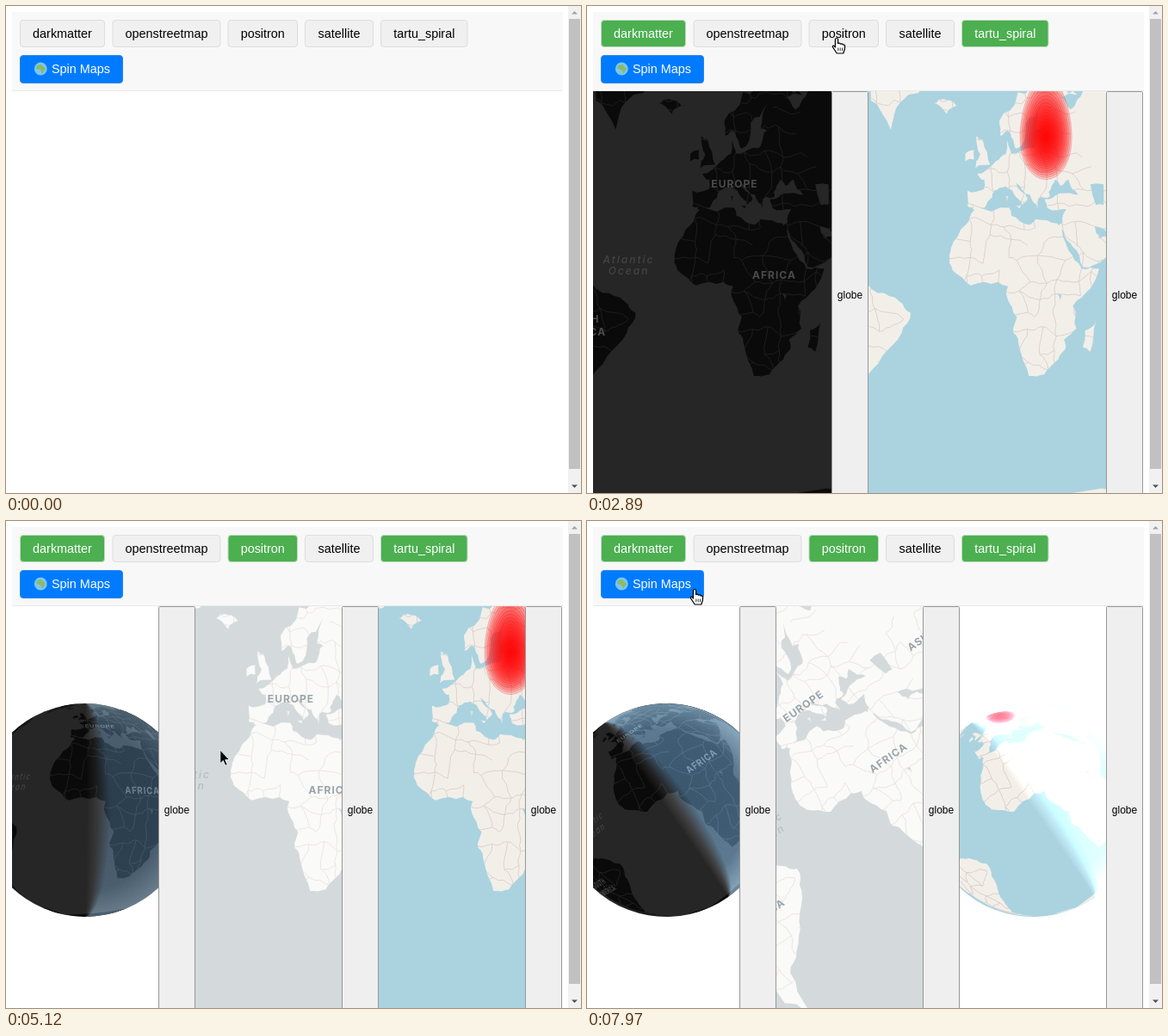
An HTML page with a canvas that plays this animation: 668x566 px, repeating every 8 s.

```html
<!DOCTYPE html>
<html>
<head>
<meta charset="utf-8">
<title>Map viewer</title>
<style>
html, body { margin: 0; width: 100%; height: 100%; overflow: hidden; background: #fff; }
canvas { display: block; width: 668px; height: 566px; }
</style>
</head>
<body>
<canvas id="stage" width="668" height="566"></canvas>
<script>
const ctx = document.getElementById('stage').getContext('2d');
const UI = '"Liberation Sans", Arial, sans-serif';
const RAD = Math.PI / 180, K = 146, CAM = 711, LIMB = 124, MID_Y = 336;

const clamp = v => Math.max(0, Math.min(1, v));
const ease = v => v * v * (3 - 2 * v);
const lonOf = x => x / K / RAD;
const latOf = y => Math.atan(Math.sinh(-y / K)) / RAD;

let seed = 7;
function rand() {
  seed = (seed * 16807) % 2147483647;
  return seed / 2147483647 - .5;
}

// Split every edge and push its middle sideways, for a natural coast
function rough(pts, depth, closed = true) {
  if (!depth) return pts;
  const out = [], n = pts.length;
  for (let i = 0; i < n; i += 2) {
    const x = pts[i], y = pts[i + 1];
    out.push(x, y);
    if (!closed && i + 2 >= n) break;
    const dx = pts[(i + 2) % n] - x, dy = pts[(i + 3) % n] - y;
    const k = rand() * Math.min(.3, 2 / Math.hypot(dx, dy));
    out.push(x + dx / 2 - dy * k, y + dy / 2 + dx * k);
  }
  return rough(out, depth - 1, closed);
}

// Key points of the coasts as lon, lat
const africa = [-6,36,10,37,11,34,19,30.5,22,32.7,32,31,37,20,43,12,51,12,47,3,39,-5,40.6,-15,35,-20,35.5,-24,32.5,-28,26,-34,19,-34.6,14.5,-22.5,12,-17,13.5,-10,9,-1,9.5,4,5,6,-7.5,4.4,-13,9,-17.3,14.7,-16.5,21,-9.8,30.5];
const north = [-5.5,36,-9,37.5,-9,43,-1.5,43.4,-1.3,46.5,-4.5,48.3,4,52,8.5,54,9,57.5,11,54,21,55.5,23.5,59.2,30,60,22,60.3,25,65.5,17.5,61.5,16,56.5,12.8,55.5,10.5,59.3,6,58.5,5.5,62,14,67.5,26,71,41,67,33,66.5,38,64.3,44,68,68,69,73,73,110,76,180,70];
const asia = [180,64,163,60,157,51,155,59.3,136,55,140,48,128,40,126.5,35,121,40,119,36,121,28,108,21.5,108,11,100,13.5,103.5,1.4,98.5,8,96,16.5,90,22,80,14,77.5,8,72.8,20,67,24.8,57,26,49,30,51.5,25,56.3,25.5,59.8,22.5,53,16,43.5,12.7,39,21.5,34.8,28,32.6,30];
const med = [34.3,31.3,36,36.5,27.5,36.8,26.3,40,33,42,41.5,41.5,37,46.5,33.6,44.5,31,46.5,28,42.5,28.5,41,23.3,40.3,23,36.6,19.5,41.5,13,45.5,18.4,40.2,16,38,12,42,8.5,44.3,3.2,43,0,39,-2,36.8];
const southAmerica = [-35,-8,-39,-17,-48,-27,-57,-36,-65,-41,-68,-54,-75,-48,-71,-30,-70,-18.5,-81,-5,-77.5,8,-72,12,-60,9,-50,1,-40,-2.9];
const northAmerica = [-77.5,8,-105,20,-117,32,-124,45,-140,60,-165,58,-157,71,-95,71,-94,60,-80,53,-77,62,-64,58,-57,52,-66,45,-76,36,-81,26,-96,28.5,-96,19,-88,21,-84,11];
const greenland = [-55,75,-53,66,-44,60,-40,65.5,-23,70,-20,80];
const britain = [-5.5,50,1.3,51,-2,57.5,-5,58.5,-3.2,54,-5,52];
const ireland = [-10,52,-6,52.5,-6,55,-10,54];
const iceland = [-24,65.5,-18.5,63.4,-14,65,-20,66.3];
const madagascar = [49.5,-12,47,-25,43.5,-23,44.5,-16];
const sicily = [12.5,38,15.5,38,15,36.7];
const sardinia = [8.4,41,9.6,41,9,39];
const australia = [113.5,-22,131,-12,142,-11,153,-27,148,-38,131,-31.5,115,-34];
const antarctica = [-62,-64,-50,-75,52,-65.8,170,-70,170,-83,-62,-83];
const caspian = [47,45,53,45,53,38,49.5,38];
const victoria = [32,.5,34,0,33,-2.5];

const land = [africa, [...north, ...asia, ...med], southAmerica, northAmerica, greenland, britain,
  ireland, iceland, madagascar, sicily, sardinia, australia, antarctica].map(p => rough(p, 2));
const lakes = [caspian, victoria].map(p => rough(p, 1));

// Country borders: a shaken grid with gaps, cut to the land when drawn
function makeBorders() {
  const step = 21, cols = 32, rows = 20, nodes = [], lines = [];
  for (let j = 0; j < rows; j++)
    for (let i = 0; i < cols; i++)
      nodes.push([lonOf((i - 16 + rand() * .8) * step), latOf((j - 13 + rand() * .8) * step)]);
  nodes.forEach((a, n) => {
    const links = [n % cols < cols - 1 && nodes[n + 1], nodes[n + cols]];
    for (const b of links) {
      const russia = a[0] > 34 && a[1] > 49;
      if (b && !russia && rand() < .3) lines.push(rough([...a, ...b], 2, false));
    }
  });
  return lines;
}
const borders = makeBorders();

// Text with its place on the flat map
const labels = [
  { text: 'EUROPE', x: 26, y: -129 }, { text: 'AFRICA', x: 72, y: -23 }, { text: 'ASIA', x: 181, y: -113 },
  { text: 'SOUTH', x: -155, y: 28 }, { text: 'AMERICA', x: -155, y: 43 },
  { text: 'Atlantic', x: -97, y: -41, sea: true }, { text: 'Ocean', x: -97, y: -28, sea: true }
];

const styles = {
  dark: { water: '#262626', land: '#0a0a0a', line: '#202020', text: '#4b4b4b', sea: '#444' },
  light: { water: '#d4dadc', land: '#fafaf8', line: '#ebe4e4', text: '#98a4aa', sea: '#b3bec2' },
  street: { water: '#aad3df', land: '#f2efe9', line: '#dccdcd', spiral: true }
};

function flat(lon, lat) {
  return [K * lon * RAD, -K * Math.asinh(Math.tan(lat * RAD)), false];
}

function sphere(lon, lat) {
  const a = lon * RAD, b = lat * RAD;
  const x = K * Math.cos(b) * Math.sin(a), y = -K * Math.sin(b), z = K * Math.cos(b) * Math.cos(a);
  const hidden = z < K * K / (CAM + K);
  const s = hidden ? LIMB / Math.hypot(x, y) : CAM / (CAM + K - z);
  return [x * s, y * s, hidden];
}

function trace(pts, proj, open) {
  let pen = false;
  for (let i = 0; i < pts.length; i += 2) {
    const [x, y, hidden] = proj(pts[i], pts[i + 1]);
    if (open && hidden) { pen = false; continue; }
    if (pen) ctx.lineTo(x, y); else ctx.moveTo(x, y);
    pen = true;
  }
  if (!open) ctx.closePath();
}

function shape(list, proj, color) {
  ctx.fillStyle = color;
  ctx.beginPath();
  for (const pts of list) trace(pts, proj);
  ctx.fill();
}

function drawLand(st, proj) {
  ctx.save();
  shape(land, proj, st.land);
  ctx.clip();
  ctx.strokeStyle = st.line;
  ctx.lineWidth = .9;
  ctx.beginPath();
  for (const b of borders) trace(b, proj, true);
  ctx.stroke();
  ctx.restore();
  shape(lakes, proj, st.water);
}

function drawLabels(st, proj) {
  const at = (x, y) => proj(lonOf(x), latOf(y));
  ctx.textAlign = 'center';
  ctx.textBaseline = 'middle';
  for (const { text, sea, x, y } of labels) {
    const o = at(x, y), e = at(x + 1, y), s = at(x, y + 1);
    if (o[2]) continue;
    ctx.save();
    ctx.transform(e[0] - o[0], e[1] - o[1], s[0] - o[0], s[1] - o[1], o[0], o[1]);
    ctx.font = (sea ? 'italic 500' : '700') + ' 12px Inter, "Open Sans", sans-serif';
    ctx.letterSpacing = sea ? '2px' : '1px';
    ctx.fillStyle = sea ? st.sea : st.text;
    ctx.fillText(text, 0, 0);
    ctx.restore();
  }
}

function drawSpiral(proj) {
  ctx.strokeStyle = 'rgba(255,0,0,.22)';
  ctx.fillStyle = 'rgba(255,0,0,.15)';
  ctx.lineWidth = 1;
  for (let r = 11.8; r > .5; r -= .65) {
    const ring = [];
    for (let a = 0; a < 360; a += 8)
      ring.push(26.72 + r * Math.cos(a * RAD), 58.38 + r * Math.sin(a * RAD));
    ctx.beginPath();
    trace(ring, proj);
    ctx.fill();
    ctx.stroke();
  }
}

// Sunlit half: stacked terminator arcs, warm first, then blue
function drawDay(amount) {
  const n = 10, sky = ctx.createRadialGradient(0, 0, 0, 0, 0, LIMB);
  sky.addColorStop(0, 'rgb(38,85,123)');
  sky.addColorStop(.75, 'rgb(50,98,138)');
  sky.addColorStop(1, 'rgb(125,175,212)');
  ctx.globalCompositeOperation = 'lighter';
  ctx.globalAlpha = amount / n;
  for (let i = 0; i < n; i++) {
    ctx.fillStyle = i < 4 ? 'rgb(62,62,60)' : sky;
    ctx.beginPath();
    ctx.arc(0, 0, LIMB, -Math.PI / 2, Math.PI / 2);
    ctx.ellipse(0, 0, 3 + i * 2.8, LIMB, 0, Math.PI / 2, -Math.PI / 2, true);
    ctx.fill();
  }
}

function drawMap(x, w, st, { globe, spin, day, fade }) {
  const proj = globe ? sphere : flat;
  ctx.save();
  ctx.beginPath();
  ctx.rect(x, 99, w, 467);
  ctx.clip();
  ctx.translate(x + w / 2, MID_Y);
  ctx.rotate(spin * RAD);
  if (globe) {
    ctx.beginPath();
    ctx.arc(0, 0, LIMB, 0, 7);
    ctx.clip();
  }
  ctx.fillStyle = st.water;
  ctx.fillRect(-700, -700, 1400, 1400);
  drawLand(st, proj);
  if (st.text) drawLabels(st, proj);
  if (st.spiral) drawSpiral(proj);
  if (day) drawDay(day);
  ctx.restore();
  ctx.fillStyle = `rgba(255,255,255,${1 - fade})`;
  ctx.fillRect(x, 99, w, 467);
}

function box(x, y, w, h, r, fill, stroke) {
  ctx.beginPath();
  ctx.roundRect(x + .5, y + .5, w - 1, h - 1, r);
  ctx.fillStyle = fill;
  ctx.fill();
  ctx.strokeStyle = stroke;
  ctx.lineWidth = 1;
  ctx.stroke();
}

function write(text, x, y, size, color, align = 'left') {
  ctx.font = `${size}px ${UI}`;
  ctx.letterSpacing = '0px';
  ctx.textBaseline = 'alphabetic';
  ctx.textAlign = align;
  ctx.fillStyle = color;
  ctx.fillText(text, x, y);
}

function poly(pts, fill) {
  ctx.beginPath();
  for (let i = 0; i < pts.length; i += 2) ctx.lineTo(pts[i], pts[i + 1]);
  ctx.closePath();
  ctx.fillStyle = fill;
  ctx.fill();
}

// shown: first moment on screen; began: start of the colour change
const tabs = [
  { text: 'darkmatter', x: 16, w: 99, shown: 1230, began: 1232 },
  { text: 'openstreetmap', x: 123.5, w: 126 },
  { text: 'positron', x: 257.5, w: 81.5, shown: 3580, began: 3500 },
  { text: 'satellite', x: 347, w: 80 },
  { text: 'tartu_spiral', x: 435, w: 101.5, shown: 2090, began: 1975 }
];

function mix(a, b, p) {
  return `rgb(${a.map((v, i) => Math.round(v + (b[i] - v) * p))})`;
}

function drawToolbar(t) {
  ctx.fillStyle = '#f8f8f8';
  ctx.fillRect(7, 7, 640, 91);
  ctx.fillStyle = '#e9e9e9';
  ctx.fillRect(7, 98, 640, 1);
  for (const { text, x, w, shown, began } of tabs) {
    const u = t >= shown ? clamp((t - began) / 300) : 0;
    const p = 1 - Math.pow(1 - u, 1.8);
    box(x, 16, w, 32, 3.5, mix([240, 240, 240], [76, 175, 80], p), mix([221, 221, 221], [190, 222, 192], p));
    write(text, x + w / 2, 36.6, 14.4, p > 0 ? '#fff' : '#000', 'center');
  }
  box(16, 57, 120, 33, 3.5, '#007bff', '#2b86e6');
  write('Spin Maps', 53, 77.8, 14.4, '#fff');
  ctx.beginPath();
  ctx.arc(40.3, 73, 7.4, 0, 7);
  ctx.fillStyle = '#7cc6f0';
  ctx.fill();
  poly([36, 69, 41, 68, 46, 73, 42, 79, 40, 74, 35, 73], '#8dbb62');
}

function drawScrollbar() {
  ctx.fillStyle = '#f1f1f1';
  ctx.fillRect(653, 0, 15, 566);
  ctx.fillStyle = '#c1c1c1';
  ctx.fillRect(654, 15, 13, 523);
  poly([657, 9.5, 660.5, 6, 664, 9.5], '#a3a3a3');
  poly([657, 556.5, 660.5, 560, 664, 556.5], '#505050');
}

const panels = [
  { st: styles.dark, open: 1230, load: 1430, globe: 4920, hover: [4300, 5000], press: 4740 },
  { st: styles.light, open: 3580, load: 3700 },
  { st: styles.street, open: 2090, load: 2200, globe: 6210, hover: [5600, 6300] }
];

function drawPanels(t) {
  const spin = t < 7900 ? 0 : -35.3 * Math.min(1, (t - 7865) / 105);
  const list = panels.filter(p => t >= p.open), step = 639 / list.length;
  list.forEach(({ st, load, globe = Infinity, hover = [], press }, i) => {
    const x = Math.round(7 + i * step), bx = Math.round(7 + (i + 1) * step) - 43;
    const fade = clamp((t - load) / 300);
    if (fade) drawMap(x, bx - x, st, { fade, spin, globe: t >= globe, day: clamp((t - globe) / 300) });
    const over = t > hover[0] && t < hover[1], down = t >= press && t < globe;
    box(bx, 99, 43, 475, 1, down ? '#f5f5f5' : over ? '#e4e4e5' : '#efefef', '#979797');
    write('globe', bx + 21.5, 339.5, 12, '#000', 'center');
  });
}

// time, x, y of the pointer tip
const way = [
  [240, 645, 218], [810, 83, 31], [1400, 83, 31], [1840, 458, 28], [2200, 458, 28], [2870, 290, 37],
  [3690, 290, 37], [4160, 210, 231], [4360, 200, 257], [4420, 200, 257], [4450, 182, 264],
  [4940, 182, 264], [5690, 638, 279], [6240, 638, 279], [6980, 139, 112], [7050, 139, 112], [7240, 125, 79]
];

function drawHand() {
  ctx.beginPath();
  ctx.moveTo(-1.6, 11);
  ctx.lineTo(-1.6, 1.5);
  ctx.quadraticCurveTo(0, -1, 1.6, 1.5);
  ctx.lineTo(1.6, 6.6);
  ctx.quadraticCurveTo(3.4, 5.6, 4.4, 7.2);
  ctx.quadraticCurveTo(6.4, 6.2, 7.2, 8);
  ctx.quadraticCurveTo(9.6, 7.6, 9.6, 9.8);
  ctx.lineTo(9.4, 13);
  ctx.lineTo(7.8, 18);
  ctx.lineTo(.2, 18);
  ctx.lineTo(-4.6, 10.6);
  ctx.quadraticCurveTo(-4.6, 8.2, -2.6, 9.6);
  ctx.closePath();
  ctx.fillStyle = '#fff';
  ctx.strokeStyle = '#000';
  ctx.lineWidth = 1.2;
  ctx.fill();
  ctx.stroke();
  ctx.beginPath();
  for (const k of [1.8, 4.2, 6.6]) { ctx.moveTo(k, 11.5); ctx.lineTo(k, 15); }
  ctx.lineWidth = .8;
  ctx.stroke();
}

function drawArrow() {
  poly([0, 0, 0, 15.5, 3.5, 12.2, 6, 18, 8.3, 17, 5.8, 11.4, 10.6, 11.2], '#000');
  ctx.strokeStyle = '#fff';
  ctx.lineWidth = .8;
  ctx.stroke();
}

function drawPointer(t) {
  if (t < way[0][0]) return;
  const i = way.findLastIndex(w => w[0] <= t);
  const a = way[i], b = way[i + 1] || [8000, a[1], a[2]];
  const p = ease((t - a[0]) / (b[0] - a[0]));
  const x = a[1] + (b[1] - a[1]) * p, y = a[2] + (b[2] - a[2]) * p;
  const onTab = y > 16 && y < 48 && tabs.some(k => x > k.x && x < k.x + k.w);
  const onSpin = y > 57 && y < 90 && x > 16 && x < 136;
  ctx.save();
  ctx.translate(x, y);
  ctx.lineJoin = 'round';
  if (onTab || onSpin) drawHand(); else drawArrow();
  ctx.restore();
}

function frame() {
  const t = performance.now() % 8000;
  ctx.fillStyle = '#fff';
  ctx.fillRect(0, 0, 668, 566);
  drawToolbar(t);
  drawPanels(t);
  drawScrollbar();
  drawPointer(t);
  requestAnimationFrame(frame);
}
frame();
</script>
</body>
</html>
```
